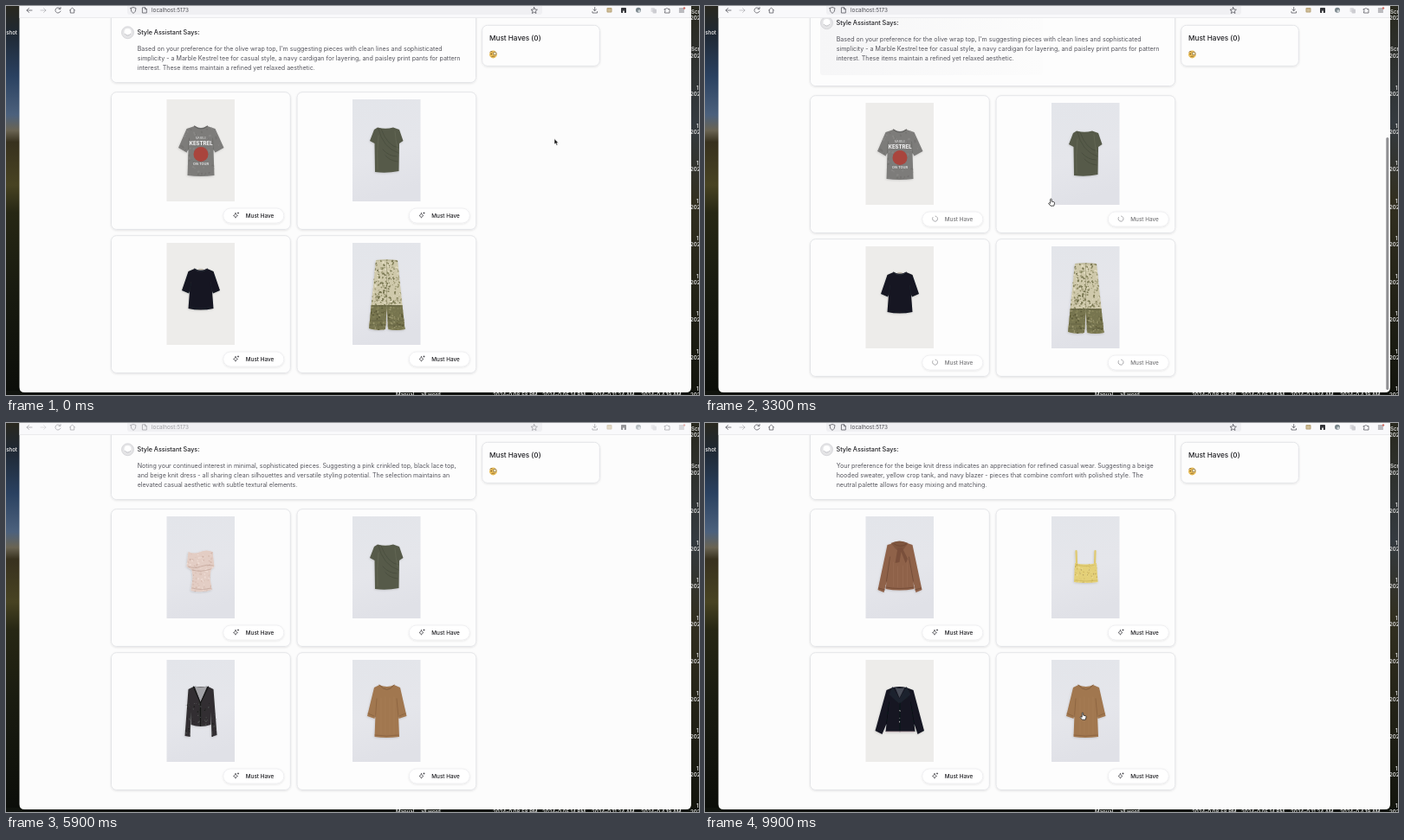
Recreate the animation shown at these times as an HTML page. Size 800 px wide and 450 px high, loop 10 s.

```html
<!DOCTYPE html>
<html lang="en">
<head>
<meta charset="utf-8">
<title>Style Assistant</title>
<style>
  html, body { margin: 0; width: 100%; height: 100%; overflow: hidden; background: #11150f; }
  svg { display: block; width: 800px; height: 450px; font-family: Inter, "Open Sans", sans-serif; }
  .line { fill: none; stroke: #5b5b62; stroke-width: .8; stroke-linecap: round; stroke-linejoin: round; }
  .card { fill: #fdfdfd; stroke: #e4e5e8; stroke-width: 1; filter: url(#shadow); }
  .strong { font-weight: 500; fill: #1d1d21; }
  .desk { font-size: 6px; font-weight: 600; fill: #dedede; }
</style>
</head>
<body>
<svg id="stage" viewBox="0 0 800 450"></svg>
<script>
const LOOP = 10000, STEP = 100;
const MESSAGES = [
  ["Based on your preference for the olive wrap top, I'm suggesting pieces with clean lines and sophisticated",
   "simplicity - a Marble Kestrel tee for casual style, a navy cardigan for layering, and paisley print pants for pattern",
   "interest. These items maintain a refined yet relaxed aesthetic."],
  ["Noting your continued interest in minimal, sophisticated pieces. Suggesting a pink crinkled top, black lace top,",
   "and beige knit dress - all sharing clean silhouettes and versatile styling potential. The selection maintains an",
   "elevated casual aesthetic with subtle textural elements."],
  ["Your preference for the beige knit dress indicates an appreciation for refined casual wear. Suggesting a beige",
   "hooded sweater, yellow crop tank, and navy blazer - pieces that combine comfort with polished style. The",
   "neutral palette allows for easy mixing and matching."]
];
const OUTFITS = [
  ["tee", "olive", "knit", "pants"],
  ["pink", "olive", "lace", "dress"],
  ["sweater", "crop", "blazer", "dress"]
];
const SWAPS = [4000, 9600];
const LOADS = [[2700, 4000], [8300, 9600]];
const SCROLLBAR = [[2700, 4600], [8300, 9700]];
const INACTIVE = [5200, 7900];
// Pointer tip: time, x, y
const PATH = [
  [0, 633, 153.5], [1200, 633, 153.5], [2300, 399.5, 223.5], [3600, 399.5, 223.5],
  [4200, 622, 279.5], [4700, 622, 279.5], [5300, 640, 470], [6400, 640, 470],
  [7100, 526, 307.5], [7900, 436, 335.5], [LOOP, 436, 335.5]
];
const SLOTS = [[185.5, 108], [400, 108], [185.5, 274], [400, 274]];

const path = (d, fill, extra = "") => `<path d="${d}" fill="${fill}" ${extra}/>`;
const folds = (d, color, width = .7) =>
  `<path d="${d}" fill="none" stroke="${color}" stroke-width="${width}" stroke-linecap="round"/>`;
const label = (x, y, size, text, extra = "") => `<text x="${x}" y="${y}" font-size="${size}" ${extra}>${text}</text>`;

function random(seed) {
  return () => (seed = seed * 16807 % 2147483647) / 2147483647;
}

function specks(count, box, colors, size, seed) {
  const next = random(seed), [x, y, w, h] = box;
  return Array.from({ length: count }, (_, i) => {
    const px = x + next() * w, py = y + next() * h, r = size * (.5 + next());
    return `<ellipse cx="${px.toFixed(1)}" cy="${py.toFixed(1)}" rx="${r.toFixed(2)}" ry="${(r * .7).toFixed(2)}"
      transform="rotate(${i * 47 % 180} ${px.toFixed(1)} ${py.toFixed(1)})" fill="${colors[i % colors.length]}"/>`;
  }).join("");
}

function patterned(id, d, fill, inside) {
  return `<clipPath id="clip-${id}"><path d="${d}"/></clipPath>${path(d, fill)}<g clip-path="url(#clip-${id})">${inside}</g>`;
}

const WARM = "#edecea", COOL = "url(#cool)";
const GARMENTS = {
  tee: [WARM, patterned("tee", "M32 31Q39.5 35 47 31L56 34 66 56 56 61.5 54 58 55 88Q39 90 24 88L25 58 23 61.5 13.5 56 23 34Z", "#7d7c7a",
    specks(90, [14, 30, 52, 60], ["#878684", "#747371"], 1.2, 5) + folds("M25 58L26 45M54 58L53 45", "#686765")) +
    folds("M32 31Q39.5 37 47 31", "#646362", 1.2) +
    label(39.5, 46, 3, "MARBLE", 'text-anchor="middle" fill="#ddd"') +
    label(39.5, 52.5, 6, "KESTREL", 'text-anchor="middle" fill="#eee" font-weight="800"') +
    '<circle cx="39.5" cy="63.5" r="8.5" fill="#a9443d"/>' +
    label(39.5, 76, 4, "ON TOUR", 'text-anchor="middle" fill="#ddd" font-weight="700"')],
  olive: [COOL, path("M29 32.5Q38 35 47 32.5L54 35 58.5 48 54 51 53.5 83Q39 86 26 84L25.5 51 20 48 25 35Z", "#565a49") +
    folds("M30 34Q35 56 53 62M33 34Q40 54 53 56M51 66Q42 66 35 58M52 72Q43 71 38 65", "#474b3c") +
    folds("M49 37Q50 48 52 58M30 42Q28 60 29 81", "#666a58")],
  knit: [WARM, path("M32 30Q39 33 47 30L54 33 61.5 55 53.5 58.5 52.5 56 54 76Q39 79 25 76L26.5 56 25.5 58.5 17.5 55 25 33Z", "#121520") +
    folds("M32 30Q39 36 47 30", "#292c36", 1.1) + folds("M27 74Q39 77 52 74M27 56L28 45M52 56L51 45", "#20232d") +
    path("M37 30h5v1.3h-5z", "#c7beac")],
  pants: [COOL, patterned("pants", "M27 20Q39 18.5 52 20L60.5 100Q51 102 41 100L39.7 75 38 100Q27 102 19 99Z", "#cfc9ab",
    specks(330, [18, 20, 43, 58], ["#88865f", "#a6a17e", "#76744f", "#e4dec4"], 1.05, 11) +
    path("M16 72h48v34H16z", "#77754f") + specks(200, [18, 72, 44, 30], ["#5c5a38", "#98946c", "#858258"], .9, 23) +
    folds("M18 73H62M18 90H62M18 95H62", "#5a5839", .6) + folds("M39.5 22V75M28 20H52", "#8f8b68", .5))],
  pink: [COOL, patterned("pink", "M25 41Q32 44 39 41T53 41L55 58 51 62 50 71 52 85Q40 89 28 86L30 71 29 62 23 58Z", "#e3cdc4",
    specks(120, [23, 40, 32, 48], ["#eedcd4", "#d4b8ad", "#dbc3b9"], 1, 7) +
    folds("M25 58Q32 61 39 58T54 57M29 62Q40 65 51 61M29 83Q40 86 51 83", "#c5a79c", .8))],
  lace: [COOL, path("M31 31H48L54 34 58 87 52 89 51 60 51 75Q39 79 28 75L28 60 27 89 21 88 25 34Z", "#302f30") +
    path("M32 30Q39 33 47 30L39 49Z", "#a3a3a7") + folds("M31 31L39 50 48 31M39 50V76", "#151516", 1.1) +
    patterned("lace", "M30 50H50V76H30ZM22 50L27 50 27 89 21 88ZM52 50H56L58 87 52 89Z", "none",
      specks(90, [21, 44, 37, 45], ["#4d4c4e", "#1d1c1d", "#565558"], .7, 9))],
  dress: [COOL, path("M31 29Q40 33 48 29L55 32 62.5 65 53.5 68 53 63 54 89Q39 91 25.5 89L26.5 63 25.5 68 17 65 25 32Z", "#a1774f") +
    folds("M31 29Q40 40 48 29", "#85603f", 1) + folds("M18 62L25 65M54 65L61 62M26 87Q39 89 53 87M26.5 66L28 45M53 66L51 45", "#875f3d") +
    folds("M33 44V86M38 43V86M43 44V86M48 43V86", "#a98059", .5)],
  sweater: [COOL, path("M32 31Q40 28 48 31L54 33 65 85 58 88 55 76 56 84Q39 87 23 84L24 76 21 88 14 85 25 33Z", "#8f624a") +
    path("M29 31Q39 26 49 31L43 39 36 39Z", "#7e543e") + path("M37 36L34 54 39 53 41 41 46 54 49 50 42 36Z", "#7a503a") +
    folds("M33 32Q40 37 47 32M24 75L28 47M55 75L50 47M23 82Q39 85 56 82M15 83L22 85M57 85L64 83", "#6b4631") +
    folds("M32 53V81M37 58V82M43 57V82M48 50V81", "#9b6e56", .5)],
  crop: [COOL, folds("M29 56L28.5 40M50 56L50.5 40", "#dfc970", 2.2) +
    patterned("crop", "M27 54Q39 57 52 54L53.5 76Q40 78 26 76Z", "#e4d078",
      specks(65, [26, 55, 28, 22], ["#c9ae55", "#eee0a0", "#b7a160"], .7, 17)) +
    folds("M28 56Q40 59 51 56M27 74Q40 76 53 74", "#cbb45a")],
  blazer: [WARM, path("M31 32Q39 30 47 32L55 35 67.5 82 60 86 56 74 57 83H23L24 74 19 86 11 82 24 35Z", "#151823") +
    path("M34 32Q39 34 45 32L39 44Z", "#4a4d58") + path("M31 31L27 40 39 51 52 40 47 31 39 45Z", "#1e222d") +
    folds("M39.5 50V83M24 74L27 49M56 74L52 49", "#0a0c14") + folds("M24 83H56", "#b59ea4", .8) +
    specks(4, [39, 56, .6, 22], ["#aaa9aa"], .7, 4)]
};

const defs = `<defs>
  <filter id="shadow" x="-5%" y="-10%" width="110%" height="125%"><feDropShadow dx="0" dy=".8" stdDeviation=".8" flood-opacity=".1"/></filter>
  <filter id="soft"><feGaussianBlur stdDeviation=".4"/></filter>
  <filter id="fall" x="-30%" y="-30%" width="160%" height="160%"><feDropShadow dx="-.5" dy=".8" stdDeviation=".8" flood-opacity=".15"/></filter>
  <linearGradient id="cool" x1="0" y1="0" x2=".2" y2="1"><stop stop-color="#e3e5ea"/><stop offset=".6" stop-color="#e5e6eb"/><stop offset="1" stop-color="#e0e1e7"/></linearGradient>
  <linearGradient id="hill" x1="0" y1="0" x2="0" y2="1">
    <stop stop-color="#29281f"/><stop offset=".07" stop-color="#1f2833"/><stop offset=".18" stop-color="#2a4160"/>
    <stop offset=".28" stop-color="#4c617d"/><stop offset=".32" stop-color="#6a6453"/><stop offset=".35" stop-color="#38311e"/>
    <stop offset=".46" stop-color="#484322"/><stop offset=".53" stop-color="#272714"/><stop offset=".72" stop-color="#191b10"/><stop offset="1" stop-color="#0b0d09"/>
  </linearGradient>
  <linearGradient id="ridge" x1="0" y1="0" x2="0" y2="1"><stop stop-color="#29291f"/><stop offset=".3" stop-color="#343a40"/><stop offset=".5" stop-color="#322f20"/><stop offset="1" stop-color="#12140d"/></linearGradient>
  <linearGradient id="shimmer"><stop stop-color="#f6f6f7"/><stop offset="1" stop-color="#fcfcfc"/></linearGradient>
  <clipPath id="page"><path d="M15.5 13.5H791V441Q791 447 785 447H21.5Q15.5 447 15.5 441Z"/></clipPath>
  ${Object.entries(GARMENTS).map(([id, [back, art]]) =>
    `<g id="${id}"><rect width="78.5" height="118" fill="${back}"/><g filter="url(#fall)"><g filter="url(#soft)">${art}</g></g></g>`).join("")}
</defs>`;

const desktop = () => {
  const right = Array.from({ length: 9 }, (_, i) => {
    const y = 102 + i * 43.5;
    return label(797, y - 5, 6, "1") + label(790, y + 2, 6, "2024");
  }).join("");
  const dates = ["08.58 PM", "05.14 PM", "11.24 AM", "4.19 AM"].map((time, i) =>
    label(562 + i * 57, 452, 6, `2024-0 ${time}`)).join("");
  return `<rect width="800" height="450" fill="url(#ridge)"/><rect width="18" height="450" fill="url(#hill)"/>
    <rect y="445" width="800" height="5" fill="#10130e"/>
    <g class="desk">${label(-7, 33, 6, "enshot")}${label(791, 9, 6, "Scr")}${label(790, 16, 6, "202")}
    ${label(791, 52, 6, "Scr")}${label(790, 60, 6, "202")}${right}${label(450, 452, 6, "Manual")}${label(479, 452, 6, "all word")}${dates}</g>`;
};

const toolbar = `<path d="M15.5 0H791V13.5H15.5Z" fill="#f9f9fb"/><path d="M15.5 13.5H791" stroke="#e5e5e8" stroke-width=".7"/>
  <path d="M140 0H619V7Q619 10 616 10H143Q140 10 140 7Z" fill="#f0f0f3"/>
  <g id="icons"><g class="line">
    <path d="M30 5H24M26.5 2.5L24 5 26.5 7.5"/><path d="M40 5H46M43.5 2.5L46 5 43.5 7.5" opacity=".4"/>
    <path d="M62.5 3A3.1 3.1 0 1 0 63 6M63 1.5V3.5H61"/><path d="M73.5 5L76.5 2 79.5 5M74.3 4.5V8H78.7V4.5"/>
    <path d="M144 2.5L147 1.5 150 2.5Q150 7 147 8.5 144 7 144 2.5Z"/><path d="M157.8 1.8H160.5L162.3 3.6V8H157.8ZM160.5 1.8V3.7H162.3"/>
    <path d="M609.7 1.5L610.8 4 613.4 4.2 611.4 5.9 612 8.5 609.7 7.1 607.4 8.5 608 5.9 606 4.2 608.6 4Z"/>
    <path d="M679.7 1.5V5.5M678 4L679.7 5.5 681.4 4M677 6.5V8H682.5V6.5"/>
    <path d="M760.5 3.5H762Q763 1 764 3.5H766V8H760.5V6.5Q762.5 5.8 760.5 5Z"/><path d="M777.3 3H782.5M777.3 5H782.5M777.3 7H782.5"/>
  </g>
  <rect x="693.5" y="2" width="6" height="5.5" rx="1" fill="#b5a076"/><path d="M694.5 4H698.5M694.5 5.8H698.5" stroke="#f3e5c5" stroke-width=".7"/>
  <rect x="710" y="2" width="6" height="6" rx=".8" fill="#35363a"/><rect x="712" y="5.5" width="2" height="2.5" fill="#dadada"/>
  <circle cx="730" cy="4.8" r="3" fill="#7a868c"/><circle cx="731" cy="5.8" r="1.6" fill="#c9d1d4"/>
  <rect x="744.5" y="2" width="4.5" height="5" rx="1" fill="#dcdce0"/><rect x="746.5" y="3.5" width="4.5" height="5" rx="1" fill="#cdcdd2"/>
  <circle cx="783" cy="2.5" r="1.2" fill="#cf6a62"/>
  ${label(168, 7.3, 6.4, "localhost:5173", 'fill="#4c4c52"')}</g>`;

const slot = ([x, y], i) => `<rect class="card" x="${x - 64}" y="${y - 8.3}" width="206.8" height="158.7" rx="6"/>
  <use class="photo" x="${x}" y="${y}"/>
  <rect x="${x + 65.3}" y="${y + 126}" width="70" height="17" rx="8.5" fill="#fff" stroke="#ececef" stroke-width=".8" filter="url(#shadow)"/>
  <g class="action">
    <g transform="translate(${x + 80} ${y + 134})">
      <path class="line spark" style="stroke:#3a3a3f;stroke-width:.7" d="M-.5 -2.4Q-.1 0 2 .5 -.1 1 -.5 3.2 -.9 1 -3 .5 -.9 0 -.5 -2.4ZM2.5 -3.2V-1.8M1.8 -2.5H3.2"/>
      <path class="line spinner" d="M2.2 -2A3 3 0 1 0 2.6 1.5"/>
    </g>
    ${label(x + 91.3, y + 136.6, 6.35, "Must Have", 'class="strong"')}
  </g>`;

stage.innerHTML = `${defs}${desktop()}
  <path d="M15.5 0H791V441Q791 447 785 447H21.5Q15.5 447 15.5 441Z" fill="#fcfcfc"/>
  <g clip-path="url(#page)">
    <rect class="card" id="panel" x="121.5" y="-20" width="421" height="108.5" rx="6"/>
    <rect id="skeleton" x="133" y="10" width="257" height="70" rx="3" fill="url(#shimmer)"/>
    <g id="message">
      <circle cx="140.5" cy="30.7" r="7" fill="#e4e4e6" stroke="#cfcfd3" stroke-width=".7"/>
      <circle cx="140.5" cy="30" r="4" fill="#fff"/><path d="M137 32Q140.5 36 144 32" fill="none" stroke="#b5b5ba" stroke-width=".8"/>
      ${label(151.5, 33.3, 7.2, "Style Assistant Says:", 'class="strong"')}
      ${[51.8, 62.8, 73.9].map(y => label(151.7, y, 7.08, "", 'class="words" fill="#55555d"')).join("")}
    </g>
    <g id="grid">${SLOTS.map(slot).join("")}</g>
    <rect class="card" x="549.7" y="22.3" width="135.6" height="47" rx="6"/>
    ${label(558, 39.5, 8.2, "Must Haves (0)", 'class="strong"')}
    <circle cx="562.4" cy="56" r="4.4" fill="#e8bd58"/><path d="M558.5 53.5Q560 51.5 561.5 53M560.5 58.7Q562.5 57.5 564 58.8" fill="none" stroke="#7d5627" stroke-width=".7"/>
    <circle cx="564.3" cy="55" r="1.8" fill="#f5e6bd" stroke="#6b5a48" stroke-width=".6"/><circle cx="560.2" cy="55.5" r=".7" fill="#5a3815"/>
    <rect id="bar" x="786.3" y="152" width="3" height="292" rx="1.5" fill="#909093"/>
  </g>${toolbar}
  <g id="pointer" stroke="#fff" stroke-width=".6" stroke-linejoin="round">
    <path id="arrow" d="M0 0V6.6L1.5 5.3 2.6 7.8 3.8 7.2 2.8 4.9H4.8Z" fill="#111"/>
    <path id="hand" d="M-.8 0Q0 -1 .7 0V2.6L3.3 3.2Q4.2 3.5 4 4.6L3.3 7.7H-.5L-3 4.9Q-2.6 3.7 -.8 4.8Z" fill="#fff" stroke="#222" stroke-width=".8"/>
  </g>`;

const all = selector => [...stage.querySelectorAll(selector)];
const pick = id => document.getElementById(id);
const photos = all(".photo"), words = all(".words"), actions = all(".action"), sparks = all(".spark"), spinners = all(".spinner");
const [panel, skeleton, message, grid, bar, icons, pointer, arrow, hand] =
  ["panel", "skeleton", "message", "grid", "bar", "icons", "pointer", "arrow", "hand"].map(pick);
const during = (t, [from, to]) => t >= from && t < to;
const show = (node, on) => node.style.display = on ? "" : "none";
const shift = (node, x, y) => node.setAttribute("transform", `translate(${x} ${y})`);

function pointerAt(t) {
  const i = PATH.findIndex(key => key[0] > t);
  const [t0, x0, y0] = PATH[i - 1], [t1, x1, y1] = PATH[i];
  const k = (t - t0) / (t1 - t0), ease = k * k * (3 - 2 * k);
  return [x0 + (x1 - x0) * ease, y0 + (y1 - y0) * ease];
}

function draw(t) {
  const scene = SWAPS.filter(swap => t >= swap).length;
  const loading = LOADS.some(span => during(t, span));
  const drop = loading ? 4 : 0;

  words.forEach((node, i) => node.textContent = MESSAGES[scene][i]);
  photos.forEach((node, i) => node.setAttribute("href", "#" + OUTFITS[scene][i]));
  shift(message, 0, loading ? -11 : 0);
  shift(panel, 0, drop);
  shift(grid, 0, drop);
  show(skeleton, loading);
  show(bar, SCROLLBAR.some(span => during(t, span)));
  actions.forEach(node => node.setAttribute("opacity", loading ? .6 : 1));
  sparks.forEach(node => show(node, !loading));
  spinners.forEach(node => {
    show(node, loading);
    node.setAttribute("transform", `rotate(${(t - 8600) * .36})`);
  });
  icons.setAttribute("opacity", during(t, INACTIVE) ? .5 : 1);

  const [x, y] = pointerAt(t);
  const over = SLOTS.some(([sx, sy]) => x > sx - 1 && x < sx + 79 && y > sy + drop && y < sy + drop + 118);
  shift(pointer, x, y);
  show(arrow, !over);
  show(hand, over);
}

function tick() {
  draw(Math.floor(performance.now() % LOOP / STEP) * STEP);
  requestAnimationFrame(tick);
}
tick();
</script>
</body>
</html>
```
